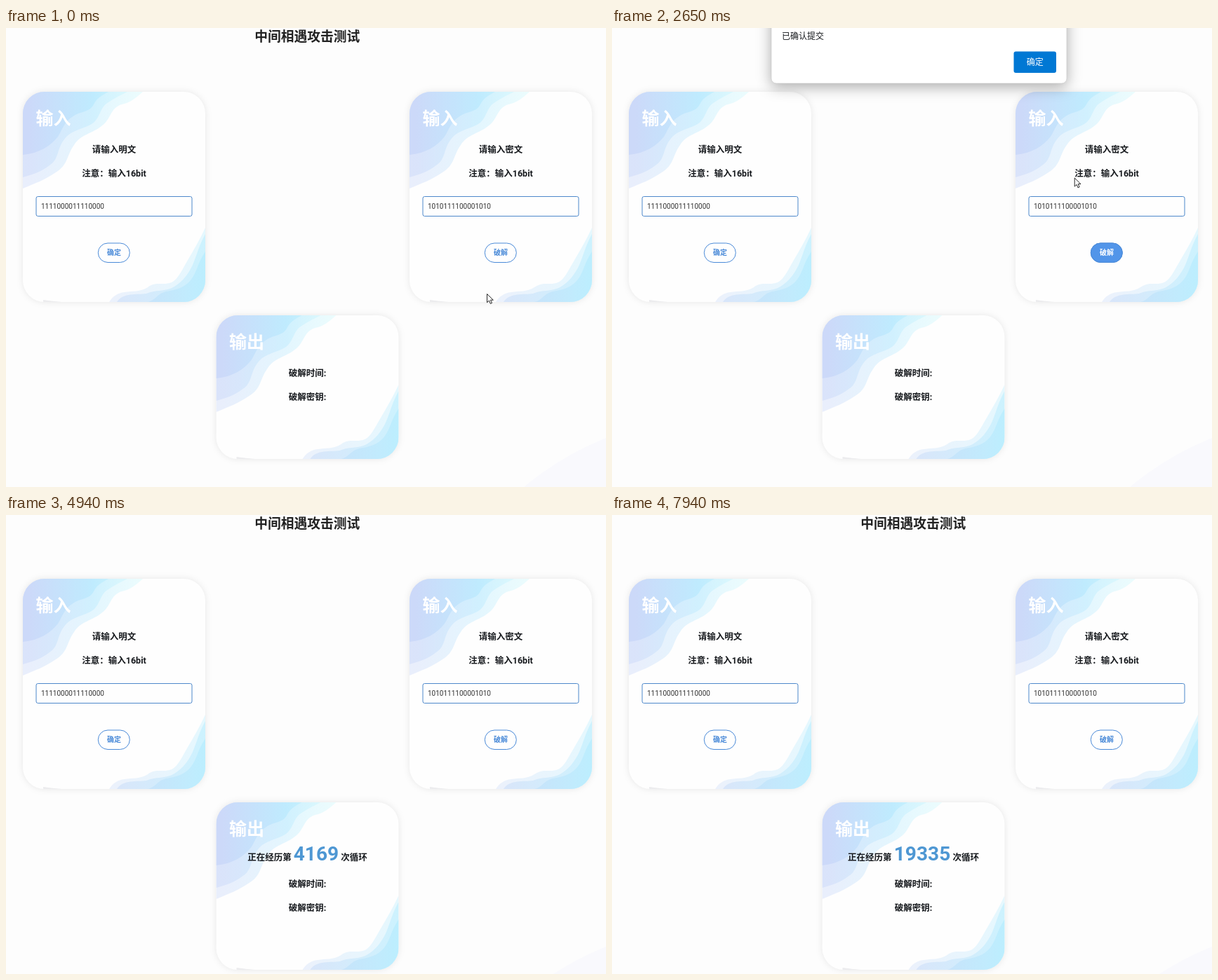
These frames come from a looping animation (855x655 px, 8000 ms). An HTML page:

```html
<!DOCTYPE html>
<html lang="zh-CN">
<head>
<meta charset="utf-8">
<title>中间相遇攻击测试</title>
<style>
  html, body { margin: 0; width: 100%; height: 100%; overflow: hidden; background: #fdfdfd; }
  svg { display: block; }
  text { font: 700 12.5px Roboto, "Noto Sans CJK SC", "Noto Sans CJK", sans-serif; fill: #16191d; white-space: pre; }
  .mid { text-anchor: middle; }
  .title { font-size: 18.75px; fill: #222; }
  .heading { font-size: 25px; fill: #fff; }
  .value { font-size: 10px; font-weight: 400; fill: #333; }
  .label { font-size: 10px; fill: #4a8ad8; }
  .count { font-size: 28.1px; fill: #4e97d3; }
  .alert { font-size: 12px; font-weight: 400; }
  .card { fill: #fefefe; filter: drop-shadow(0 0 5px rgba(0, 0, 0, .09)); }
  .field { fill: #fefefe; stroke: #4d88cb; }
  .panel { fill: #fff; stroke: #c4c4c4; stroke-width: .6; filter: drop-shadow(0 5px 10px rgba(0, 0, 0, .32)); }
</style>
</head>
<body>
<svg id="stage" width="855" height="655" viewBox="0 0 855 655">
  <defs>
    <linearGradient id="topFill" gradientUnits="userSpaceOnUse" x1="0" x2="172" y1="0" y2="0">
      <stop offset=".05" stop-color="#ccd9f9"/>
      <stop offset=".58" stop-color="#bfebfe"/>
      <stop offset="1" stop-color="#d2fafc"/>
    </linearGradient>
    <linearGradient id="bottomFill" gradientUnits="userSpaceOnUse" x1="125" x2="260" y1="0" y2="0">
      <stop offset="0" stop-color="#cddcf8"/>
      <stop offset=".8" stop-color="#c1ebfd"/>
      <stop offset="1" stop-color="#bceefe"/>
    </linearGradient>
    <g id="topWaves" fill="url(#topFill)">
      <path opacity=".42" d="M0 0H171C160 10 152 16 141 18C124 23 126 40 112 49C100 59 82 61 73 76C62 91 65 104 47 115C31 126 19 130 0 138Z"/>
      <path opacity=".52" d="M0 0H149C137 6 129 10 122 15C109 22 111 38 98 46C84 54 68 55 59 68C48 82 52 96 38 105C25 115 14 118 0 122Z"/>
      <path d="M0 0H122C111 6 105 10 101 18C95 29 86 27 73 34C59 42 57 53 50 64C40 77 23 88 0 90Z"/>
    </g>
    <g id="bottomWaves" fill="url(#bottomFill)">
      <path opacity=".38" d="M260-106C251-87 244-75 234-58C225-43 220-30 209-27C197-24 189-29 178-21C167-14 156-16 145-14C135-13 128-8 123 0H260Z"/>
      <path opacity=".6" d="M260-97C251-81 248-67 242-53C235-38 226-28 216-22C203-14 189-18 176-12C163-10 143-14 134 0H260Z"/>
      <path d="M260-72C249-56 248-42 239-31C229-19 215-17 204-15C190-11 190-3 178 0H260Z"/>
      <path fill="#ececee" d="M29-3Q42-1 56 0H29Z"/>
    </g>
    <path id="arrow" d="M.5.5V12.7L3.4 10 5.3 14.4 7.4 13.5 5.5 9.2H9.3Z" fill="#fff" stroke="#111" stroke-width=".9" stroke-linejoin="round"/>
    <path id="hand" d="M-1.5 10V1.2Q0-.8 1.3 1.2V6.2L6.6 7.3Q7.9 7.8 7.7 9.8L6.4 14.2V17H-1V15L-5.4 10.3Q-5.6 8.6-3.7 8.9Z" fill="#fff" stroke="#111" stroke-width=".9" stroke-linejoin="round"/>
  </defs>
  <path id="backdrop" fill="#f9f9fd" d="M738 655Q792 610 855 585V655Z"/>
  <text class="title mid" x="429.3" y="18.7">中间相遇攻击测试</text>
  <g id="cards"></g>
  <g id="dialog">
    <rect class="panel" x="227" y="-60" width="421" height="139" rx="7"/>
    <text class="alert" x="242" y="16.3">已确认提交</text>
    <rect x="572.5" y="33.5" width="60.5" height="30.5" rx="3" fill="#0078d4"/>
    <text class="alert mid" x="602.7" y="52.6" style="fill:#fff">确定</text>
  </g>
  <use id="cursor"/>
</svg>
<script>
const LOOP = 8000;
const $ = id => document.getElementById(id);
const clamp = v => Math.max(0, Math.min(1, v));

function card(id, x, y, height, heading, content) {
  return `<g transform="translate(${x} ${y})">
    <clipPath id="${id}Clip"><rect id="${id}Mask" width="260" height="${height}" rx="31"/></clipPath>
    <rect id="${id}Face" class="card" width="260" height="${height}" rx="31"/>
    <g clip-path="url(#${id}Clip)">
      <use href="#topWaves"/>
      <use id="${id}Foot" href="#bottomWaves" y="${height}"/>
    </g>
    <text class="heading" x="18.5" y="46.5">${heading}</text>${content}</g>`;
}

const line = (text, y) => `<text class="mid" x="130" y="${y}">${text}</text>`;

const inputCard = (id, x, prompt, value, action) => card(id, x, 91, 300, '输入', `
  ${line(prompt, 87.2)}${line('注意：输入16bit', 121.2)}
  <rect class="field" x="19" y="149.5" width="222" height="28" rx="2.5"/>
  <text class="value" x="26" y="167">${value}</text>
  <rect x="107.3" y="216" width="45" height="27.5" rx="13.75" fill="#fefefe" stroke="#4a8ad8"/>
  <text class="label mid" x="130" y="233.4">${action}</text>
  <g id="${id}Hover">
    <rect x="107.3" y="216" width="45" height="27.5" rx="13.75" fill="#5295e9" stroke="#4a8ad8"/>
    <text class="label mid" x="130" y="233.4" style="fill:#fff">${action}</text>
  </g>`);

$('cards').innerHTML =
  inputCard('plain', 24, '请输入明文', '1111000011110000', '确定') +
  inputCard('cipher', 575, '请输入密文', '1010111100001010', '破解') +
  card('output', 299.5, 410, 205, '输出', `
    <text id="progress" class="mid" x="130" y="83.3">正在经历第 <tspan id="count" class="count"></tspan> 次循环</text>
    <g id="results">${line('破解时间:', 87.2)}${line('破解密钥:', 121.2)}</g>`);

// Each row: time, then values
const cursorPath = [
  [0, 685, 379], [60, 685, 379], [620, 152, 319], [880, 155, 320], [940, 292.5, 332.5],
  [1420, 701, 318], [2530, 701, 318], [3080, 593, 51], [3400, 593, 51], [3960, 860, 130]
];
const countPath = [[4290, 1], [4940, 4164], [6000, 9666], [7940, 19330], [8000, 19630]];

function along(path, t, ease = u => u) {
  let i = 1;
  while (i < path.length - 1 && t > path[i][0]) i++;
  const [from, to] = [path[i - 1], path[i]];
  const u = ease(clamp((t - from[0]) / (to[0] - from[0])));
  return from.slice(1).map((v, k) => v + (to[k + 1] - v) * u);
}

const easeOut = u => 1 - (1 - u) ** 2;
const pulse = (t, start, end, duration) =>
  clamp((t - start) / duration) * (1 - clamp((t - end) / duration));

function draw(t) {
  const [x, y] = along(cursorPath, t, easeOut);
  const overButton = y > 306 && y < 335 && (Math.abs(x - 154) < 23 || Math.abs(x - 705) < 23);
  $('cursor').setAttribute('href', overButton ? '#hand' : '#arrow');
  $('cursor').setAttribute('transform', `translate(${x} ${y})`);
  $('cursor').style.display = t < 3960 ? '' : 'none';

  $('plainHover').style.opacity = pulse(t, 520, 880, 240);
  $('cipherHover').style.opacity = pulse(t, 1240, 3480, 240);

  const shown = pulse(t, 1980, 3400, 200);
  const scale = 1 + .01 * (1 - shown);
  $('dialog').style.opacity = shown;
  $('dialog').setAttribute('transform',
    `translate(${437.5 * (1 - scale)} ${-14.2 * (1 - shown)}) scale(${scale})`);

  const running = t >= 4290;
  const height = running ? 239 : 205;
  for (const part of ['Mask', 'Face']) $('output' + part).setAttribute('height', height);
  $('outputFoot').setAttribute('y', height);
  $('progress').style.display = running ? '' : 'none';
  $('count').textContent = Math.round(along(countPath, t)[0]);
  $('results').setAttribute('transform', `translate(0 ${running ? 34 : 0})`);
  $('backdrop').setAttribute('transform', `translate(0 ${running ? 31 : 0})`);
}

function tick() {
  draw(performance.now() % LOOP);
  requestAnimationFrame(tick);
}
tick();
</script>
</body>
</html>
```
